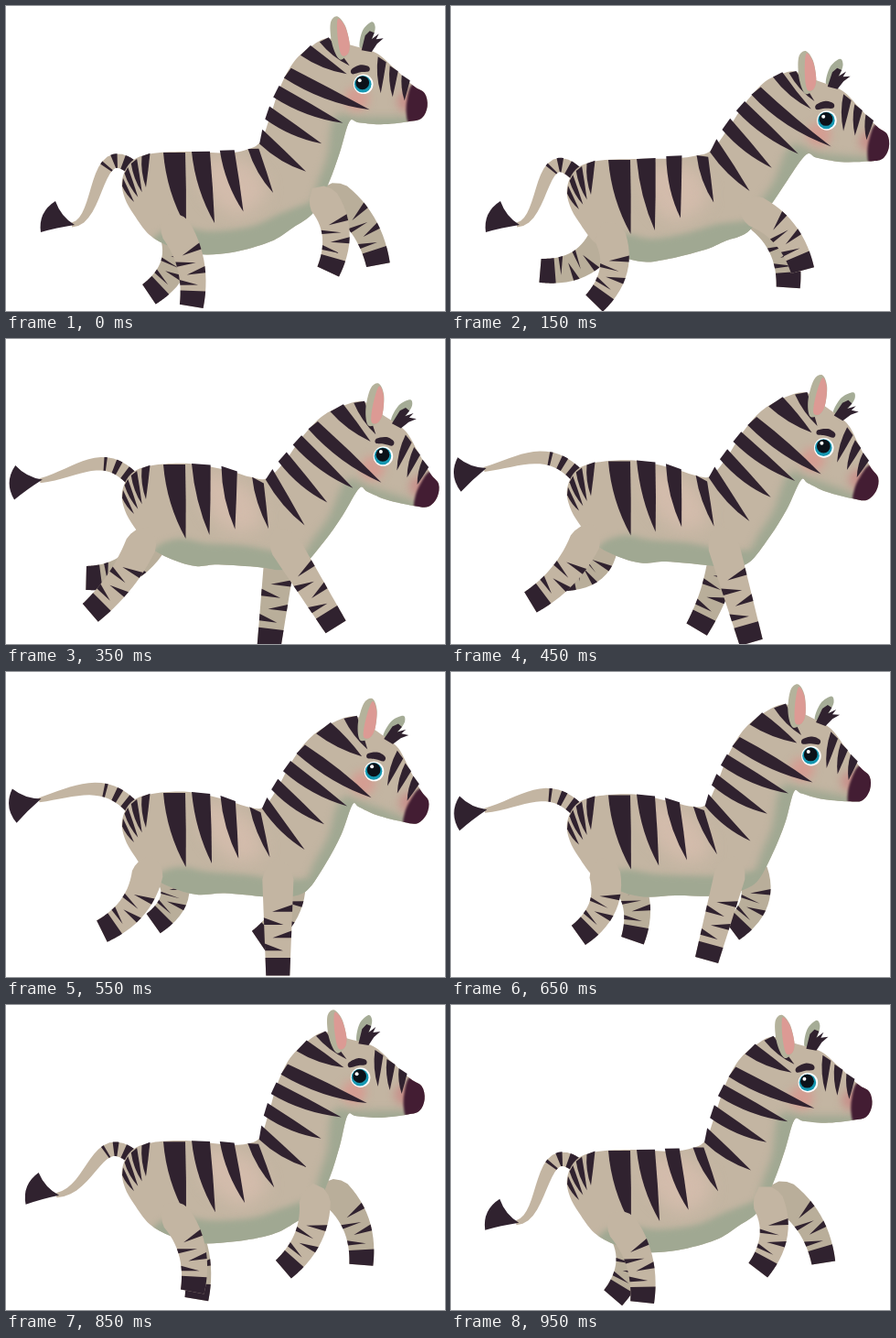
An HTML page with a canvas for the animation above (1 s loop, 480 by 333 pixels).

```html
<!DOCTYPE html>
<html lang="en">
<head>
<meta charset="utf-8">
<title>Running zebra</title>
<style>
  html, body { margin: 0; width: 100%; height: 100%; overflow: hidden; background: #fff; }
  canvas { display: block; width: 480px; height: 333px; }
</style>
</head>
<body>
<canvas id="stage" width="480" height="333"></canvas>
<script>
const ctx = document.getElementById('stage').getContext('2d');
const LOOP = 1000, STEP = 50, RAD = Math.PI / 180;
const INK = '#30222f', COAT = '#c3b5a2', FAR = '#b9ae9a', SAGE = '#a0a892';

// three values drive the body: neck lowering, rump rising, head tilting
const TIMES = [0, 150, 250, 350, 550, 750, 950];
const NOD = [0.12, 0.77, 1, 0.82, 0.5, 0, 0.11];
const RISE = [0, -0.29, 0.68, 0.82, 1, 0.71, 0.04];
const TILT = [0, 0.22, 0.85, 0.9, 1, 0.08, 0];

// stride and step hold centre, reach and phase of the hoof along x and y
const LEGS = {
  farHind: { hip: [172, 232], swing: 8, stride: [148, 69, 83], step: [291, 31, 40], hop: 0 },
  farFore: { hip: [327, 200], swing: 21, stride: [338, 70, 10], step: [300, 26, 245], hop: 10 },
  nearHind: { hip: [164, 228], swing: 10, stride: [148, 62, 28], step: [306, 23, -18], hop: 0 },
  nearFore: { hip: [317, 200], swing: 21, stride: [332, 54, -68], step: [304, 22, 180], hop: 8 }
};

const OUTLINE = [
  137, 170, 160, 161, 200, 159, 240, 161, 263, 158, 279, 149, 290, 120, 300, 90, 315, 62,
  334, 45, 352, 36, 376, 43, 405, 52, 425, 69, 446, 88, 458, 96, 461, 110, 455, 123, 440, 127,
  410, 130, 386, 128, 376, 127, 366, 160, 354, 194, 338, 226, 315, 243, 290, 258,
  250, 269, 210, 271, 180, 263, 157, 250, 140, 228, 130, 210, 127, 190];

let nod, lift, neckTurn, headTurn;

const ramp = u => (u = Math.min(1, Math.max(0, u)), u * u * (3 - 2 * u));
const mix = (a, b, u) => a + (b - a) * u;
const wave = ([mid, reach, phase], angle) => mid + reach * Math.cos(angle + phase * RAD);

// periodic cubic interpolation through the key values
function track(values, t) {
  const n = TIMES.length;
  const at = k => TIMES[(k + n) % n] + Math.floor(k / n) * LOOP;
  const val = k => values[(k + n) % n];
  t %= LOOP;
  let i = n - 1;
  while (TIMES[i] > t) i--;
  const h = at(i + 1) - at(i), u = (t - at(i)) / h, d = val(i + 1) - val(i);
  const slope = k => (val(k + 1) - val(k - 1)) / (at(k + 1) - at(k - 1)) * h;
  const m = slope(i), e = slope(i + 1);
  return val(i) + u * (m + u * (3 * d - 2 * m - e + u * (m + e - 2 * d)));
}

// moves a resting point with the body, the neck or the head
function skin(x, y) {
  const dx = x - 391, dy = y - 86;
  const turn = mix(neckTurn, headTurn, ramp((x - 0.5 * dy - 335) / 50)) * RAD;
  const cos = Math.cos(turn), sin = Math.sin(turn);
  const hx = 387 + 31 * nod + dx * cos - dy * sin;
  const hy = 78 + 61 * nod + dx * sin + dy * cos;
  const sway = 16 * nod * Math.max(0, y - 160) / 80 * Math.exp(-(((x - 255) / 32) ** 2));
  const w = ramp((x - 0.35 * (y - 150) - 200) / 110);
  return [mix(x - sway, hx, w), mix(y + lift, hy, w)];
}

function paint(color, blur = 0) {
  ctx.filter = blur ? `blur(${blur}px)` : 'none';
  ctx.fillStyle = color;
  ctx.fill();
  ctx.filter = 'none';
}

const pairs = a => a.flatMap((v, i) => i % 2 ? [] : [skin(v, a[i + 1])]);

function poly(pts) {
  ctx.beginPath();
  pts.forEach(p => ctx.lineTo(...p));
  ctx.closePath();
}

// smooth closed shape through resting points
function blob(flat) {
  const p = pairs(flat), n = p.length, q = k => p[(k + n) % n];
  ctx.beginPath();
  ctx.moveTo(...p[0]);
  for (let i = 0; i < n; i++) {
    const a = q(i - 1), b = q(i), c = q(i + 1), d = q(i + 2);
    ctx.bezierCurveTo(b[0] + (c[0] - a[0]) / 6, b[1] + (c[1] - a[1]) / 6,
      c[0] - (d[0] - b[0]) / 6, c[1] - (d[1] - b[1]) / 6, ...c);
  }
}

function disc(x, y, r, color, blur) {
  ctx.beginPath();
  ctx.arc(...skin(x, y), r, 0, 7);
  paint(color, blur);
}

// curved wedge from edge points a and b to a tip
function stripe([ax, ay], [bx, by], [tx, ty]) {
  const bend = (x, y, k) => skin((x + tx) / 2 + k * (ty - y), (y + ty) / 2 - k * (tx - x));
  ctx.beginPath();
  ctx.moveTo(...skin(ax, ay));
  ctx.quadraticCurveTo(...bend(ax, ay, -0.11), ...skin(tx, ty));
  ctx.quadraticCurveTo(...bend(bx, by, 0.01), ...skin(bx, by));
  paint(INK);
}

function bezier(p, t) {
  while (p.length > 2) p = p.slice(2).map((v, i) => mix(p[i], v, t));
  return p;
}

// stripes that start along one curve and end along another
function fan(count, edge, tips, from, gap, half) {
  for (let i = 0; i < count; i++) {
    const u = from + gap * i;
    stripe(bezier(edge, u - half), bezier(edge, u + half), bezier(tips, i / (count - 1)));
  }
}

// point beside a curve, s from -1 to 1 across its width
function rim(p, width, t, s) {
  const [x, y] = bezier(p, t), [u, v] = bezier(p, t + 0.01);
  const k = width(t) * s / Math.hypot(u - x, v - y);
  return [x - (v - y) * k, y + (u - x) * k];
}

function band(p, width, from, to, color) {
  const left = [], right = [];
  for (let i = 0; i <= 16; i++) {
    const t = mix(from, to, i / 16);
    left.push(rim(p, width, t, 1));
    right.unshift(rim(p, width, t, -1));
  }
  poly(left.concat(right));
  paint(color);
}

// the hoof circles, and the knee bends forward by whatever length is left over
function leg({ hip, swing, stride, step, hop }, angle, color) {
  const [x, y] = skin(wave([hip[0], swing, 25], angle), hip[1]);
  const fx = wave(stride, angle);
  const fy = wave(step, angle) + hop * Math.cos(2 * (angle + step[2] * RAD));
  const dx = fx - x, dy = fy - y, d = Math.hypot(dx, dy);
  const bend = 0.45 * Math.sqrt(Math.max(0, 118 ** 2 - d * d)) / d;
  const p = [x, y, (x + fx) / 2 + dy * bend, (y + fy) / 2 - dx * bend, fx, fy];
  const width = u => (18 - 5 * u) * Math.min(1, Math.sqrt(u * 6));
  band(p, width, 0, 1, color);
  for (let i = 0; i < 4; i++) {
    const u = 0.43 + 0.11 * i, s = i % 2 ? 1 : -1;
    poly([rim(p, width, u - 0.03, s), rim(p, width, u + 0.03, s), rim(p, width, u + 0.03, -0.4 * s)]);
    paint(INK);
  }
  band(p, width, 0.85, 1, INK);
}

function tail(t) {
  const up = Math.max(0, track(RISE, t + 20));
  const x = 72 - 36 * Math.sin(Math.min(1, up) * 90 * RAD), y = 239 - 100 * up;
  const p = [140, 178 + lift, 95 + 13 * up, 140 - 27 * up, 105 - 30 * up, 235 - 105 * up, x, y];
  const width = u => 8 - 5.5 * u * u;
  band(p, width, 0, 1, COAT);
  for (let i = 0; i < 3; i++) band(p, width, 0.02 + 0.145 * i, 0.1 + 0.12 * i, INK);
  ctx.save();
  ctx.translate(x, y);
  ctx.rotate(-33 * up * up * RAD);
  ctx.beginPath();
  ctx.moveTo(3, 0);
  ctx.quadraticCurveTo(-12, -9, -18, -26);
  ctx.quadraticCurveTo(-37, -14, -34, 8);
  ctx.quadraticCurveTo(-17, 3, 3, 0);
  paint(INK);
  ctx.restore();
}

function torso() {
  blob(OUTLINE);
  paint(COAT);
  ctx.save();
  ctx.clip();
  blob([215, 170, 265, 172, 285, 205, 255, 228, 220, 205]);
  paint('#dfc2b490', 9);
  blob([360, 122, 390, 122, 455, 124, 440, 140, 385, 140, 372, 215, 335, 235, 340, 200, 352, 165]);
  paint(SAGE, 4);
  blob([165, 250, 190, 241, 225, 246, 270, 241, 305, 226, 345, 215, 345, 245, 290, 280, 215, 290, 160, 270]);
  paint(SAGE, 3);
  disc(384, 102, 13, '#dc938bb0', 5);
  disc(439, 105, 11, '#c97f80b0', 5);
  blob([445, 86, 462, 92, 466, 110, 458, 130, 442, 130, 438, 118, 439, 102]);
  paint('#431d33', 1);
  ctx.restore();
}

function markings() {
  fan(4, [127, 196, 128, 168, 160, 160], [140, 214, 153, 198], 0.07, 0.27, 0.08);
  for (let i = 0; i < 4; i++) {
    const x = 172 + 31 * i;
    stripe([x, 160 - i], [x + 24 - 4 * i, 160 - i], [197 + 32 * i, 241 - 4 * i * i]);
  }
  fan(4, [278, 150, 292, 70, 350, 36], [329, 182, 350, 130, 398, 114], 0.04, 0.175, 0.05);
  stripe([322, 55], [333, 44], [373, 75]);
  stripe([343, 40], [353, 35], [376, 66]);
  for (let i = 0; i < 3; i++) {
    const x = 407 + 13 * i, y = 56 + 10 * i;
    stripe([x, y], [x + 9, y + 6], [x + 3, y + 40 - 6 * i]);
  }
}

function face() {
  poly(pairs([389, 49, 393, 33, 398, 28, 403, 30, 400, 37, 408, 31, 405, 37, 413, 36, 406, 42, 400, 51]));
  paint(INK);
  blob([355, 20, 362, 12, 371, 22, 376, 42, 374, 53, 365, 59, 357, 43]);
  paint('#b4b29b');
  blob([363, 15, 371, 23, 376, 42, 374, 53, 367, 54, 363, 36]);
  paint('#dc9a94');
  blob([378, 70, 388, 65, 397, 67, 397, 72, 388, 73, 379, 75]);
  paint(INK);
  disc(391, 86, 10.8, '#fff');
  disc(390.5, 86, 9.3, '#1798b2');
  disc(390, 84.5, 7.4, '#0b1119');
  disc(387, 82, 2, '#fff');
}

function draw(t) {
  const angle = t / LOOP * 2 * Math.PI;
  nod = track(NOD, t);
  lift = -28 * track(RISE, t);
  neckTurn = 22 * (nod - 0.1);
  headTurn = 20 * track(TILT, t);
  ctx.clearRect(0, 0, 480, 333);
  tail(t);
  leg(LEGS.farHind, angle, FAR);
  leg(LEGS.farFore, angle, FAR);
  blob([387, 46, 390, 28, 400, 18, 404, 24, 401, 36, 396, 48]);
  paint('#a5ac96');
  torso();
  markings();
  face();
  leg(LEGS.nearHind, angle, COAT);
  leg(LEGS.nearFore, angle, COAT);
}

let start;
function tick(now) {
  start ??= now;
  draw(Math.floor((now - start) / STEP) * STEP % LOOP);
  requestAnimationFrame(tick);
}
requestAnimationFrame(tick);
</script>
</body>
</html>
```
